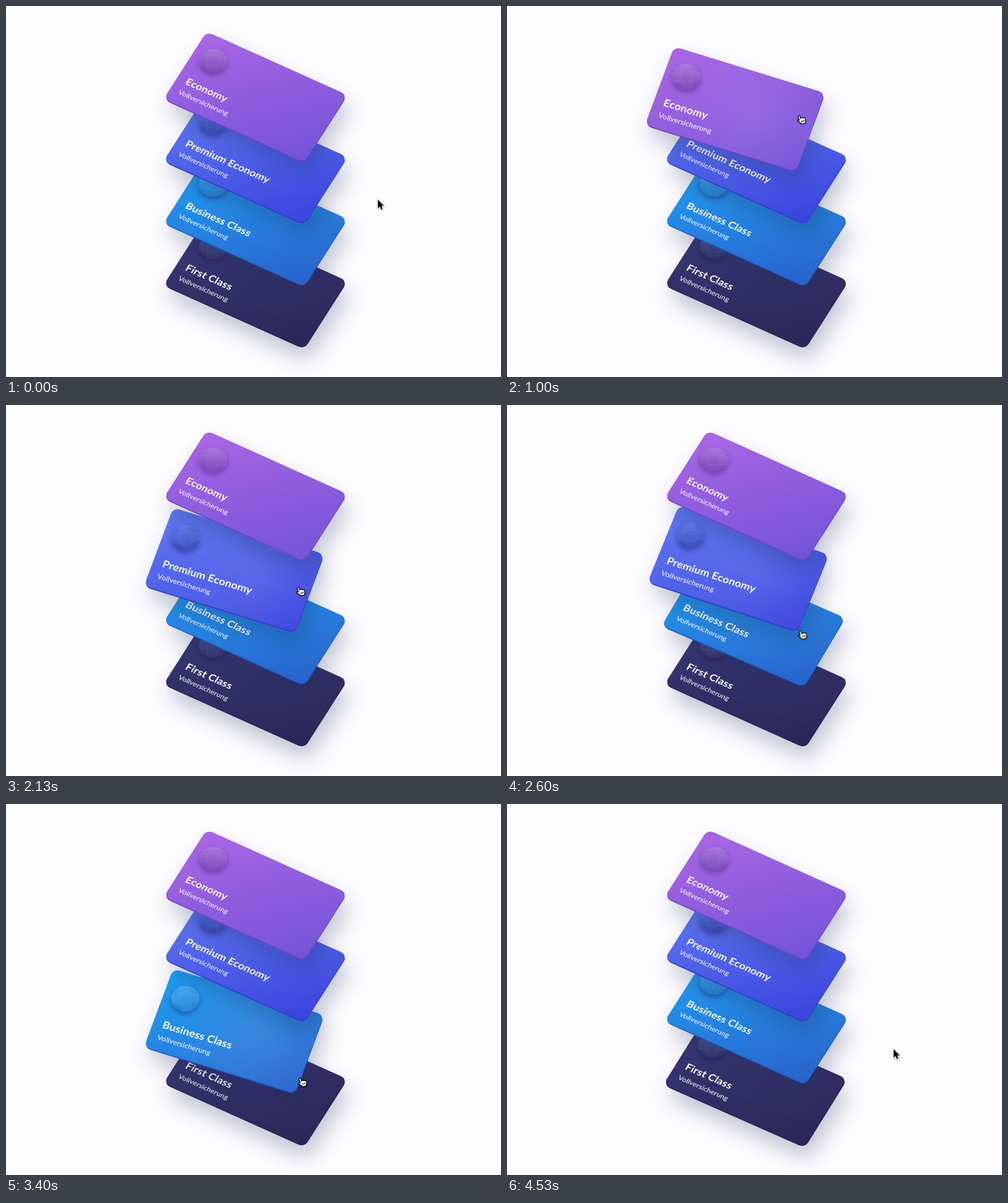
These frames come from a looping animation (800x600 px, 4590 ms). An HTML page with a canvas:

```html
<!DOCTYPE html>
<html lang="de">
<head>
<meta charset="utf-8">
<title>Reiseklassen</title>
<style>
html, body { margin: 0; height: 100%; overflow: hidden; background: #fdfcff; }
canvas { display: block; }
</style>
</head>
<body>
<canvas width="800" height="600"></canvas>
<script>
const ctx = document.querySelector('canvas').getContext('2d');
const LOOP = 4590, FPS = 15, TURN = 470;
const W = 257.5, H = 147, RADIUS = 11;

// A card is hovered from `enter` to `leave`; `face` and `gem` are gradient ends.
const cards = [
  { title: 'Economy', face: ['#aa66e3', '#7453d9'], edge: '#6e44c6', gem: ['#a470da', '#7a42b8'], enter: 460, leave: 1620 },
  { title: 'Premium Economy', face: ['#6079f1', '#3a43de'], edge: '#343cc8', gem: ['#5871ea', '#3145b8'], enter: 1620, leave: 2540 },
  { title: 'Business Class', face: ['#1f9ff3', '#2a62cb'], edge: '#2159bf', gem: ['#38a8f4', '#1b7ed6'], enter: 2540, leave: 3430 },
  { title: 'First Class', face: ['#383776', '#2b2659'], edge: '#27234f', gem: ['#454d94', '#2b2e64'], enter: 3430, leave: 4200 }
];

// Pointer tip: time, x, y
const pointerPath = [
  [0, 601, 313], [230, 565, 258], [460, 515, 206], [850, 475, 182], [1150, 475, 183],
  [1620, 474, 257], [2130, 473, 295], [2300, 473, 306], [2540, 474, 357], [2870, 476, 394],
  [3200, 476, 420], [3400, 476, 444], [3700, 480, 485], [3930, 485, 498], [4200, 511, 483],
  [4400, 585, 425], [4530, 624, 397], [4590, 634, 390]
];

const mix = (a, b, k) => a + (b - a) * k;

// The standard CSS "ease" curve
function ease(p) {
  if (p <= 0) return 0;
  if (p >= 1) return 1;
  const bezier = (a, b, u) => 3 * a * u * (1 - u) ** 2 + 3 * b * u * u * (1 - u) + u ** 3;
  let lo = 0, hi = 1;
  for (let i = 0; i < 20; i++) {
    const mid = (lo + hi) / 2;
    if (bezier(.25, .25, mid) < p) lo = mid; else hi = mid;
  }
  return bezier(.1, 1, lo);
}

function shadow(color, blur = 0, x = 0, y = 0) {
  ctx.shadowColor = color;
  ctx.shadowBlur = blur;
  ctx.shadowOffsetX = x;
  ctx.shadowOffsetY = y;
}

function blend(gradient, [from, to]) {
  gradient.addColorStop(0, from);
  gradient.addColorStop(1, to);
  return gradient;
}

function polygon(points, fill) {
  ctx.beginPath();
  points.forEach(([x, y]) => ctx.lineTo(x, y));
  ctx.closePath();
  ctx.fillStyle = fill;
  ctx.fill();
}

function ring(count, radius) {
  return Array.from({ length: count }, (_, i) => {
    const a = (i + .5) * 2 * Math.PI / count;
    return [radius * Math.cos(a), radius * Math.sin(a)];
  });
}

function drawGem(colors, hover) {
  const outer = ring(12, 23.3), inner = ring(4, 13);
  ctx.save();
  ctx.translate(-93, -29);
  ctx.rotate(-.4);
  shadow('rgba(20,10,80,.4)', 9, 0, 4);
  polygon(outer, blend(ctx.createLinearGradient(0, -20, 0, 22), colors));
  shadow('transparent');
  ctx.lineWidth = .5;
  ctx.strokeStyle = 'rgba(255,255,255,.09)';
  const facet = (points, light) => {
    polygon(points, `rgba(255,255,255,${light})`);
    ctx.stroke();
  };
  for (let k = 0; k < 4; k++) {
    const [a, b, c, d] = [0, 1, 2, 3].map(n => outer[(3 * k + n) % 12]);
    facet([inner[k], a, b, c], .02);
    facet([inner[k], c, d, inner[(k + 1) % 4]], .04 + .02 * hover);
  }
  facet(inner, .03 + .03 * hover);
  ctx.restore();
}

function drawCard(card, index, time) {
  const hover = ease((time - card.enter) / TURN) - ease((time - card.leave) / TURN);
  const plate = (fill, dx = 0, dy = 0) => {
    ctx.setTransform(1, 0, 0, 1, mix(403, 368.6, hover) + dx, mix(146.9, 166.4, hover) + index * 100.3 + dy);
    ctx.scale(1, mix(.84, .9086, hover));
    ctx.rotate(mix(28.2, 18.7, hover) * Math.PI / 180);
    ctx.beginPath();
    ctx.roundRect(-W / 2, -H / 2, W, H, RADIUS);
    ctx.fillStyle = fill;
    ctx.fill();
  };

  shadow('rgba(30,45,90,.28)', 35, 6, 19);
  plate(card.edge, .3, 1.9);
  shadow('transparent');
  plate(blend(ctx.createLinearGradient(-100, -100, 100, 100), card.face));
  plate(blend(ctx.createRadialGradient(40, 10, 0, 40, 10, 150),
    [`rgba(255,255,255,${.09 * hover})`, 'rgba(255,255,255,0)']));
  drawGem(card.gem, hover);

  ctx.letterSpacing = '.15px';
  ctx.fillStyle = '#fff';
  ctx.font = '700 18px Lato, sans-serif';
  ctx.fillText(card.title, -112.7, 32);
  ctx.fillStyle = ctx.strokeStyle = 'rgba(255,255,255,.75)';
  ctx.lineWidth = .25;
  ctx.font = '500 12px Lato, sans-serif';
  ctx.fillText('Vollversicherung', -113.5, 54);
  ctx.strokeText('Vollversicherung', -113.5, 54);
  ctx.resetTransform();
}

// Smooth curve through the pointer path
function pointerAt(time) {
  const path = pointerPath, last = path.length - 1;
  const i = path.findIndex(key => key[0] > time) - 1;
  const a = path[i], b = path[i + 1], span = b[0] - a[0], u = (time - a[0]) / span;
  const slope = (k, axis) => {
    const p = path[Math.max(0, k - 1)], n = path[Math.min(last, k + 1)];
    return (n[axis] - p[axis]) / (n[0] - p[0]) * span;
  };
  return [1, 2].map(axis => mix(a[axis], b[axis], u * u * (3 - 2 * u))
    + slope(i, axis) * u * (1 - u) ** 2 - slope(i + 1, axis) * u * u * (1 - u));
}

const arrow = new Path2D('M0 0V14.2L3.2 11.2L5.3 16.2L7.7 15.2L5.6 10.3H10Z');
const hand = new Path2D('M-1.6 1.2Q0-1 1.5 1.2V6Q3 4.6 4.3 6.2Q5.8 5.2 6.9 6.9Q8.8 6.2 9.3 8.2V11.2Q9 13 8 14.2V16.3H0V14.6Q-2.6 12-4.8 8.8Q-5 7-3.6 7.2Q-3 7.2-1.6 9Z');
const knuckles = new Path2D('M2 10V13.5M4.2 10V13.5M6.4 10V13.5');

function drawPointer(time) {
  const isHand = time >= cards[0].enter && time < cards[3].leave;
  ctx.save();
  ctx.translate(...pointerAt(time));
  ctx.lineJoin = 'round';
  shadow('rgba(0,0,0,.35)', 3, 0, 1);
  if (isHand) {
    ctx.translate(-1.2, -.8);
    ctx.rotate(-.28);
    ctx.scale(.92, .92);
    ctx.fillStyle = '#fff';
    ctx.fill(hand);
    shadow('transparent');
    ctx.strokeStyle = '#000';
    ctx.lineWidth = 1.3;
    ctx.stroke(hand);
    ctx.lineWidth = .9;
    ctx.stroke(knuckles);
  } else {
    ctx.strokeStyle = '#fff';
    ctx.lineWidth = 2;
    ctx.stroke(arrow);
    shadow('transparent');
    ctx.fillStyle = '#000';
    ctx.fill(arrow);
  }
  ctx.restore();
}

// The picture advances in steps of 1/15 second
function draw(now) {
  const time = Math.floor((now % LOOP + 5) * FPS / 1000) * 1000 / FPS;
  ctx.fillStyle = '#fdfcff';
  ctx.fillRect(0, 0, 800, 600);
  for (let i = cards.length - 1; i >= 0; i--) drawCard(cards[i], i, time);
  drawPointer(Math.min(time, LOOP - 1));
  requestAnimationFrame(draw);
}

draw(0);
</script>
</body>
</html>
```
